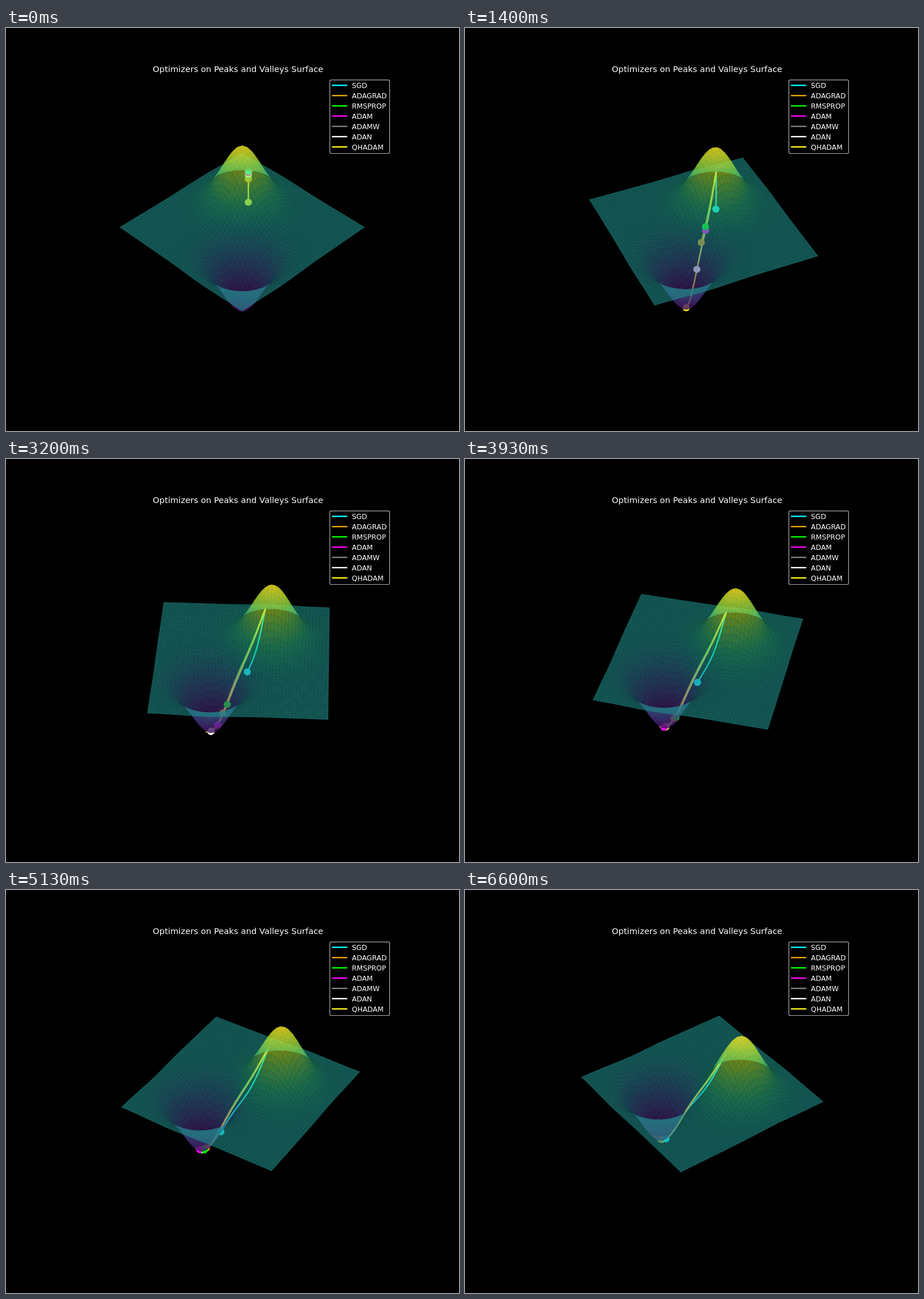
Recreate the animation shown at these times as an HTML page with a canvas. Size 794 by 705 pixels, loop 6.66 s.

```html
<!DOCTYPE html>
<html lang="en">
<head>
<meta charset="utf-8">
<title>Optimizers on Peaks and Valleys Surface</title>
<style>
  html, body { margin: 0; width: 100%; height: 100%; overflow: hidden; background: #000; }
  canvas, svg { position: absolute; left: 0; top: 0; }
  text { font-family: "DejaVu Sans", sans-serif; font-size: 12.25px; fill: #fff; }
  .title { font-size: 14.7px; text-anchor: middle; }
</style>
</head>
<body>
<canvas id="plot" width="794" height="705"></canvas>
<svg id="labels" width="794" height="705">
  <text class="title" x="406.7" y="77">Optimizers on Peaks and Valleys Surface</text>
  <rect x="567.6" y="90.9" width="104.8" height="128.6" rx="2.5" fill="#000" stroke="#ccc" stroke-opacity=".85" stroke-width="1.2"/>
</svg>
<script>
const LOOP = 6660, STEP = 200 / 3, STEPS = 100;
const CELLS = 50, HALF = 3, MID = 0.036;
const PEAK = 0.575, VALLEY = 0.595, SHARP = 0.98;
const CX = 414, CY = 348.5, SCALE = 215, PERSP = 0.0808;
const ELEV = 40 * Math.PI / 180, SIN_E = Math.sin(ELEV), COS_E = Math.cos(ELEV);
const START = [0.8, 0.5];

const bell = (x, y, c) => Math.exp(-SHARP * ((x - c) ** 2 + (y - c) ** 2));
const surface = (x, y) => bell(x, y, 1) - bell(x, y, -1);

function gradient(x, y) {
  const up = bell(x, y, 1), down = bell(x, y, -1);
  return [x, y].map(v => 2 * SHARP * ((v + 1) * down - (v - 1) * up));
}

// Each rule returns the change of one coordinate from its gradient, state and step count.
const sgd = lr => g => -lr * g;

const adagrad = lr => (g, s) => {
  s.v += g * g;
  return -lr * g / Math.sqrt(s.v);
};

const rmsprop = (lr, decay) => (g, s) => {
  s.v = decay * s.v + (1 - decay) * g * g;
  return -lr * g / Math.sqrt(s.v);
};

function moments(g, s, b1, b2) {
  s.m = b1 * s.m + (1 - b1) * g;
  s.v = b2 * s.v + (1 - b2) * g * g;
}

const adam = (lr, b1 = 0.9, weight = 0, b2 = 0.999) => (g, s, n, p) => {
  moments(g, s, b1, b2);
  const m = s.m / (1 - b1 ** n), v = s.v / (1 - b2 ** n);
  return -lr * (m / Math.sqrt(v) + weight * p);
};

const qhadam = (lr, nu) => (g, s) => {
  moments(g, s, 0.9, 0.999);
  return -lr * ((1 - nu) * g + nu * s.m) / Math.sqrt(s.v);
};

const series = [
  { name: "SGD", color: "#00ffff", rule: sgd(0.03) },
  { name: "ADAGRAD", color: "#eba80a", rule: adagrad(0.1) },
  { name: "RMSPROP", color: "#00ff00", rule: rmsprop(0.02, 0.9) },
  { name: "ADAM", color: "#ff00ff", rule: adam(0.03) },
  { name: "ADAMW", color: "#808080", rule: adam(0.03, 0.9, 0.01) },
  { name: "ADAN", color: "#ffffff", rule: adam(0.05, 0.8) },
  { name: "QHADAM", color: "#fcf81a", rule: qhadam(0.03, 0.7) }
];

// Plot space: a runs from valley to peak, b across, z up.
function place([x, y]) {
  const f = surface(x, y);
  return [(x + y - 2 * MID) / (2 * HALF), (x - y) / (2 * HALF), f * (f > 0 ? PEAK : VALLEY)];
}

for (const s of series) {
  const state = START.map(() => ({ m: 0, v: 0 }));
  let p = START;
  s.path = [place(p)];
  for (let n = 1; n <= STEPS; n++) {
    const g = gradient(...p);
    p = p.map((v, i) => v + s.rule(g[i], state[i], n, v));
    s.path.push(place(p));
  }
}

const viridis = ["440154", "472d7b", "3b528b", "2c728e", "21918c", "28ae80", "5ec962", "addc30", "fde725"]
  .map(h => [0, 2, 4].map(i => parseInt(h.substr(i, 2), 16)));

function cmap(t) {
  const x = Math.min(Math.max(t, 0), 1) * (viridis.length - 1);
  const i = Math.min(Math.floor(x), viridis.length - 2), f = x - i;
  const c = viridis[i].map((v, j) => Math.round(v + (viridis[i + 1][j] - v) * f));
  return `rgba(${c},0.6)`;
}

const verts = [], quads = [];
const coord = i => MID + HALF * (2 * i / CELLS - 1);
for (let i = 0; i <= CELLS; i++) {
  for (let j = 0; j <= CELLS; j++) {
    verts.push(place([coord(i), coord(j)]));
    if (i === CELLS || j === CELLS) continue;
    const n = i * (CELLS + 1) + j;
    quads.push({
      ids: [n, n + 1, n + CELLS + 2, n + CELLS + 1],
      color: cmap(0.5 + surface(coord(i + 0.5), coord(j + 0.5)) / 2),
      depth: 0
    });
  }
}

function projector(deg) {
  const s = Math.sin(deg * Math.PI / 180), c = Math.cos(deg * Math.PI / 180);
  return ([a, b, z]) => {
    const right = a * s + b * c, far = a * c - b * s;
    const depth = z * SIN_E - far * COS_E, k = SCALE / (1 - PERSP * depth);
    return [CX + right * k, CY - (far * SIN_E + z * COS_E) * k, depth];
  };
}

const g = document.getElementById("plot").getContext("2d");

function trace(points) {
  g.beginPath();
  for (const p of points) g.lineTo(p[0], p[1]);
}

// The view turns one degree per step.
function draw(step) {
  const project = projector(step);
  g.clearRect(0, 0, 794, 705);
  g.lineWidth = 2.45;
  g.lineJoin = "round";
  g.lineCap = "square";
  const heads = [];
  for (const s of series) {
    const pts = s.path.slice(0, step + 2).map(project);
    trace(pts);
    g.strokeStyle = s.color;
    g.stroke();
    heads.push({ color: s.color, at: pts[pts.length - 1] });
  }
  heads.sort((p, q) => p.at[2] - q.at[2]);
  for (const h of heads) {
    g.beginPath();
    g.arc(h.at[0], h.at[1], 6.2, 0, 2 * Math.PI);
    g.fillStyle = h.color;
    g.fill();
  }
  // The translucent surface covers the paths.
  const flat = verts.map(project);
  for (const q of quads) q.depth = q.ids.reduce((sum, v) => sum + flat[v][2], 0);
  quads.sort((p, q) => p.depth - q.depth);
  for (const q of quads) {
    trace(q.ids.map(v => flat[v]));
    g.fillStyle = q.color;
    g.fill();
  }
}

function add(tag, attrs, text = "") {
  const el = document.createElementNS("http://www.w3.org/2000/svg", tag);
  for (const k in attrs) el.setAttribute(k, attrs[k]);
  el.textContent = text;
  document.getElementById("labels").append(el);
}
series.forEach((s, i) => {
  const y = 100.3 + i * 17.95;
  add("line", { x1: 571.2, x2: 598.2, y1: y, y2: y, stroke: s.color, "stroke-width": 2.4 });
  add("text", { x: 606.3, y: y + 4.7 }, s.name);
});

let shown = -1;
const t0 = performance.now();
function tick() {
  const t = Math.floor(((performance.now() - t0) % LOOP) / 10) * 10;
  const step = Math.min(STEPS - 1, Math.floor((t + 4) / STEP));
  if (step !== shown) draw(shown = step);
  requestAnimationFrame(tick);
}
tick();
</script>
</body>
</html>
```
